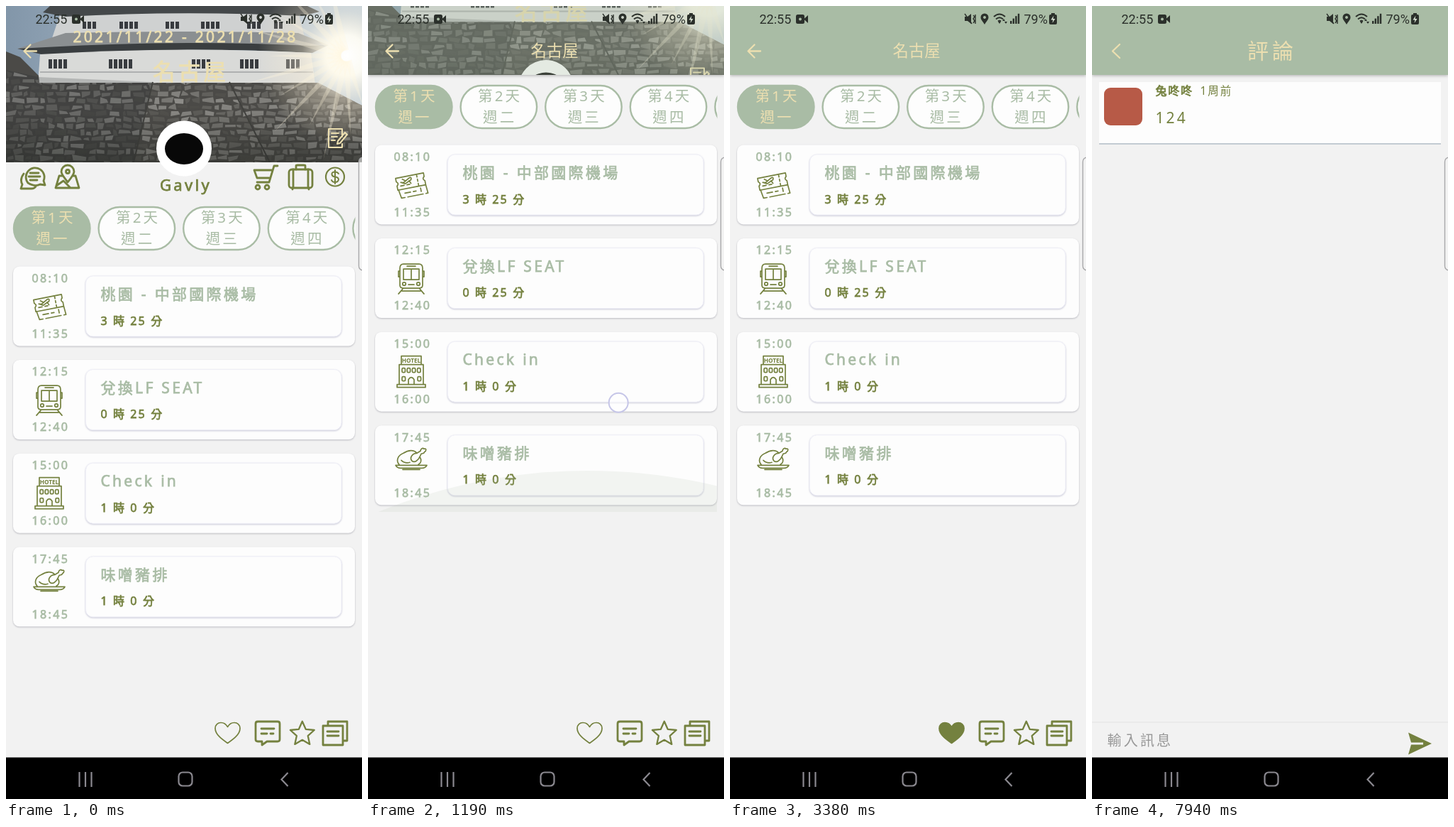
Animation of 502 by 1116 pixels, one loop 8 s. Source, as an HTML page:

```html
<!DOCTYPE html>
<html lang="zh-Hant">
<head>
<meta charset="utf-8">
<title>Trip planner</title>
<style>
html, body { margin: 0; width: 100%; height: 100%; overflow: hidden; background: #f2f2f2; }
svg { display: block; width: 502px; height: 1116px; font-family: "Noto Sans", "Noto Sans CJK TC", sans-serif; white-space: pre; }
.line { fill: none; stroke: #74813f; stroke-width: 1.7; stroke-linecap: round; stroke-linejoin: round; }
.bold { stroke-width: 2.8; }
.olive { fill: #74813f; }
.sage { fill: #a9bca5; }
.cream { fill: #ecdfb0; }
.strong { stroke-width: .75; }
.olive.strong { stroke: #74813f; }
.sage.strong { stroke: #a9bca5; }
.cream.strong { stroke: #ecdfb0; }
.card { fill: #fdfdfd; filter: drop-shadow(0 1.5px 1.2px rgba(90, 90, 105, .36)); }
.inner { fill: #fdfdfd; stroke: #efeff7; filter: drop-shadow(0 1.3px 1px rgba(110, 110, 150, .38)); }
.bar { filter: drop-shadow(0 1px 2px rgba(0, 0, 0, .28)); }
</style>
</head>
<body>
<svg id="stage" viewBox="0 0 502 1116"></svg>
<script>
const LOOP = 8000, COLLAPSE = 171;

const text = (x, y, size, str, cls, spacing = 0, extra = '') =>
  `<text x="${x}" y="${y}" font-size="${size}" class="${cls}" letter-spacing="${spacing}" ${extra}>${str}</text>`;
const path = (d, cls = 'line', extra = '') => `<path d="${d}" class="${cls}" ${extra}/>`;
const rect = (x, y, w, h, r, cls, extra = '') =>
  `<rect x="${x}" y="${y}" width="${w}" height="${h}" rx="${r}" class="${cls}" ${extra}/>`;
const circle = (x, y, r, cls, extra = '') => `<circle cx="${x}" cy="${y}" r="${r}" class="${cls}" ${extra}/>`;
const range = n => [...Array(n).keys()];

function random(seed) {
  return () => (seed = (seed * 16807) % 2147483647) / 2147483647;
}

// Irregular four-sided stones in uneven rows.
function stones() {
  const rnd = random(77);
  let out = '';
  for (let y = 92; y < 222; y += 9) {
    for (let x = -rnd() * 12; x < 502;) {
      const w = 8 + rnd() * 13, v = 78 + rnd() * 64 | 0;
      const corner = (cx, cy) => `${(cx + rnd() * 3).toFixed(1)} ${(cy + rnd() * 4).toFixed(1)}`;
      const d = `M${corner(x, y)}L${corner(x + w - 3, y)}L${corner(x + w - 3, y + 6)}L${corner(x, y + 6)}Z`;
      out += path(d, '', `fill="rgb(${v},${v - 1},${v - 5})"`);
      x += w;
    }
  }
  return out;
}

function photo() {
  const shape = (d, c) => path(d, '', `fill="${c}"`);
  const windows = (y, h, spots) => spots.map(([x, n]) =>
    range(n).map(i => rect(x + i * 7, y, 5, h, 0, '', 'fill="#383b3f"')).join('')).join('');
  const rays = range(13).map(i => {
    const a = 1.25 + i * .27, r = 75 + (i * 37) % 75;
    const p = (q, k) => `${480 + Math.cos(q) * k} ${70 + Math.sin(q) * k}`;
    return path(`M${p(a - .6, 9)}L${p(a, r)}L${p(a + .6, 9)}`, '', 'fill="#fff4dc" opacity=".32"');
  }).join('');
  return `<g clip-path="url(#photoClip)">
    ${rect(0, 0, 502, 220, 0, '', 'fill="url(#sky)"')}
    ${shape('M80 0H410L425 60H60Z', '#cfd1d1')}
    ${shape('M62 0H425L442 8L418 14Q250 6 84 15L52 9Z', '#44484a')}
    ${windows(22, 10, [[108, 3], [160, 4], [225, 3], [275, 4], [340, 3], [378, 2]])}
    ${shape('M84 38Q250 34 412 38L455 55L430 62Q250 52 56 64L16 60Z', '#8b8f91')}
    ${shape('M16 60L56 58Q250 47 430 56L455 55L432 66Q250 56 54 69Z', '#3a3e40')}
    ${shape('M48 68Q250 56 430 66L436 110H45Z', '#d9dad8')}
    ${windows(75, 13, [[60, 4], [145, 5], [262, 4], [330, 4], [395, 3]])}
    ${rect(48, 92, 385, 2, 0, '', 'fill="#aeb0b0"')}
    ${shape('M0 64L20 72L46 98L47 108H440L502 140V220H0Z', '#4b4a47')}
    <g clip-path="url(#wallClip)">${stones()}</g>
    ${shape('M0 90L46 100L207 107L180 220H0Z', 'rgba(30,36,42,.2)')}
    ${path('M207 107L180 220M315 107L372 220', '', 'fill="none" stroke="#41413e" stroke-width="2"')}
    ${rect(0, 150, 502, 70, 0, '', 'fill="url(#shade)"')}
    ${circle(480, 70, 125, '', 'fill="url(#sun)"')}${rays}
  </g>`;
}

const cardIcons = [
  `<g transform="rotate(-11 61 56)">${path('M41 43H81V48Q77 51 81 54V60H41V54Q45 51 41 48ZM71 44V47M71 50V53M71 56V59M46 55H51M55 55H59')}
    ${path('M47 50L51 51L60 46Q64 45 62 49L53 53ZM54 49L50 46M59 50L61 54')}
    ${path('M42 60L44 72H49M53 72H75M79 72H82L81 60M50 66H58M62 66H66M73 63V68')}</g>`,
  path('M50 36H72Q77 36 77 42V66Q77 70 72 70H50Q45 70 45 66V42Q45 36 50 36ZM50 43H72V58H50ZM61 43V58M55 39H67M45 46H43V54H45M77 46H79V54H77M49 71L43 78M73 71L79 78M48 74H74')
    + circle(51, 64, 2.3, 'line') + circle(71, 64, 2.3, 'line') + path('M57 65H65'),
  path('M47 34H75V46H47ZM44 46H78V74H44ZM41 74H81V78H41ZM57 74V67Q61 61 65 67V74')
    + range(4).map(i => rect(48 + i * 7.2, 51, 4.4, 6, 1.5, 'line')).join('')
    + rect(48, 63, 4.6, 6, 1.5, 'line') + rect(70, 63, 4.6, 6, 1.5, 'line')
    + text(61, 43, 8.2, 'HOTEL', 'olive', 0, 'text-anchor="middle" font-weight="800"'),
  path('M44 55C39 50 42 42 50 39C57 34 65 34 69 39L74 36C74 33 77 31 79 33C83 32 82 36 80 37C79 40 77 39 75 40L73 44C76 49 75 53 71 55M69 39C63 39 58 45 62 50C66 53 71 49 73 44M47 49Q52 54 59 52M39 56H83Q81 60 76 60H46Q41 60 39 56M49 62H73')
];

const plans = [
  ['08:10', '11:35', '桃園 - 中部國際機場', '3 時 25 分'],
  ['12:15', '12:40', '兌換LF SEAT', '0 時 25 分'],
  ['15:00', '16:00', 'Check in', '1 時 0 分'],
  ['17:45', '18:45', '味噌豬排', '1 時 0 分']
];

const cards = plans.map(([from, to, title, span], i) => `<g transform="translate(0 ${366.5 + i * 131.6})">
  ${rect(10, 0, 482, 112, 9, 'card')}${rect(112.5, 13.5, 360.5, 85, 10, 'inner')}
  ${text(36.5, 22.3, 16, from, 'sage strong', 2.4)}${text(36.5, 100.3, 16, to, 'sage strong', 2.4)}
  ${text(133.5, 46.5, 21, title, 'sage strong', 3.3)}${text(133.5, 82, 16, span, 'olive strong', 2.1)}
  ${cardIcons[i]}</g>`).join('');

const pills = ['一', '二', '三', '四', '五'].map((day, i) => `<g transform="translate(${i * 119.6} 0)">
  ${rect(11, 283, 107.5, 60, 30, '', `fill="${i ? '#fdfdfd' : '#a9bca5'}" stroke="#a9bca5" stroke-width="2.4"`)}
  ${text(35.5, 304.5, 20.5, `第${i + 1}天`, i ? 'sage' : 'cream', 3.1)}
  ${text(42.5, 335, 20.5, '週' + day, i ? 'sage' : 'cream', 3.1)}</g>`).join('');

const headerIcons =
  path('M31 249A13 13 0 1 1 53 246L55 252L48 251Q41 255 31 249ZM25 236Q19 244 23 251L21 257H36Q40 257 42 254M34 235H46M32 240H48M34 245H44', 'line bold')
  + path('M79 239H75L70 256H103L98 239H94M71 253L81 246L91 256M87 248C82 241 78 237 78 233A9 9 0 0 1 96 233C96 237 91 243 87 248Z', 'line bold') + circle(87, 233, 2.5, 'line bold')
  + path('M383 225H378L371 248H354M350 231H374M350 231L354 242H371', 'line bold') + circle(355, 255, 3, 'line bold') + circle(368, 255, 3, 'line bold')
  + rect(399, 230, 33, 26, 4, 'line bold') + path('M409 230V225Q409 224 411 224H420Q422 224 422 225V230M405 230V256M426 230V256M404 258V256M427 258V256', 'line bold')
  + circle(464, 240.5, 13, 'line', 'style="stroke-width:2.2"')
  + path('M469 236Q467 233 463 233.5Q459 234 459.5 237Q460 240 464 240.5Q469 241 469 244.5Q468 248 464 248Q460 248 459 245M464 231V250', 'line', 'style="stroke-width:2"');

const header = photo()
  + text(94.5, 51, 21, '2021/11/22 - 2021/11/28', 'cream strong', 3.3)
  + text(207, 104, 31.5, '名古屋', 'cream strong', 4.2)
  + path('M474 184V173H455V199H474V194M459 179H469M459 184H467M459 189H464M468 190L478 178L481 181L471 193L467 194Z', 'line', 'style="stroke:#ecdfb0;stroke-width:2"')
  + circle(251, 200.5, 39, '', 'fill="#fff"')
  + '<ellipse cx="251" cy="201" rx="27" ry="22" fill="#080808"/>'
  + text(253.5, 259.5, 22, 'Gavly', 'olive strong', 3.3, 'text-anchor="middle"')
  + headerIcons;

const dark = 'fill="#2b302b"';
const roboto = dark + ' font-family="Roboto, sans-serif"';
const statusBar = text(41.5, 25, 18, '22:55', '', 0, roboto)
  + text(414.5, 25, 18, '79%', '', 0, roboto)
  + rect(93, 12, 12, 13, 2.5, '', dark) + path('M104 18.5L110 13V24Z', '', dark) + circle(99, 18.5, 2, '', 'fill="#a9bca5"')
  + path('M331 15H335L340 11V25L335 21H331Z', '', dark)
  + path('M331 11L341 25M343 13L345 15L343 18L345 21L343 24M346 12V25', '', 'fill="none" stroke="#2b302b" stroke-width="1.4"')
  + path('M359 26C356 21 353.5 19 353.5 16A5.5 5.5 0 0 1 364.5 16C364.5 19 362 21 359 26ZM359 14A2 2 0 1 0 359.01 14Z', '', dark + ' fill-rule="evenodd"')
  + path('M372 15Q380 8 388 15M375 18.5Q380 14 385 18.5M378 21.5Q380 20 382 21.5', '', 'fill="none" stroke="#2b302b" stroke-width="2"')
  + path('M380 25L378 22H382ZM384 21L386 18L388 21ZM387 22H391L389 25Z', '', dark)
  + range(4).map(i => rect(395 + i * 3.6, 21 - i * 3.4, 2.4, 4 + i * 3.4, 0, '', dark)).join('')
  + rect(450, 12, 11, 14, 2, '', dark) + rect(453, 10, 5, 3, 0, '', dark)
  + path('M456.5 13.5L452.5 19.5H455.5L454.5 24L458.5 18H455.5Z', '', 'fill="#dce5d8"');

const heart = 'M312.5 1037.5C304 1031.5 295 1025 295 1016.5C295 1011.5 299 1008.5 303 1008.5C307 1008.5 310.5 1011 312.5 1014.5C314.5 1011 318 1008.5 322 1008.5C326 1008.5 330 1011.5 330 1016.5C330 1025 321 1031.5 312.5 1037.5Z';
const star = 'M' + range(10).map(i => {
  const a = i * Math.PI / 5, r = i % 2 ? 8.3 : 17.8;
  return `${(417.8 + Math.sin(a) * r).toFixed(1)} ${(1024.5 - Math.cos(a) * r).toFixed(1)}`;
}).join('L') + 'Z';

const actions = path(heart, 'line', 'id="heart"')
  + path('M355 1007H383Q386 1007 386 1010V1032Q386 1035 383 1035H368L361 1040V1035H355Q352 1035 352 1032V1010Q352 1007 355 1007ZM360 1017H378M360 1024H368M373 1024H377', 'line bold')
  + path(star, 'line', 'id="star" style="stroke-width:2.3"')
  + path('M454 1012V1007H481V1034H476M447 1013H475V1040H447ZM453 1021H469M453 1027H469', 'line bold');

const arrow = d => path(d, 'line', 'style="stroke:#ecdfb0;stroke-width:2.3"');

const comments = rect(0, 0, 502, 1060, 0, '', 'fill="#f2f2f2"')
  + rect(0, -5, 502, 102, 0, 'sage bar')
  + arrow('M39 54L29 63.5L39 73') + text(219, 74, 30, '評論', 'cream', 5)
  + rect(10, 107, 482, 87, 0, '', 'fill="#fdfdfd"') + rect(10, 193.3, 482, 1.3, 0, '', 'fill="#a9b5c0"')
  + rect(17, 115, 54, 53, 9, '', 'fill="#b75a47"')
  + text(89.5, 125, 16, '兔咚咚', 'olive strong', 1.7) + text(152.5, 125, 15.5, '1周前', 'olive', 1.9)
  + text(89.5, 165, 21, '124', 'olive', 3.1)
  + rect(0, 1007.5, 502, 1, 0, '', 'fill="#e3e3e3"')
  + text(21.5, 1041, 20, '輸入訊息', '', 3.2, 'fill="#989898"')
  + path('M446 1022.5L479 1038L446 1053.5L450 1039.5H467V1036.5H450Z', 'olive');

const nav = rect(0, 1057.5, 502, 59, 0, '')
  + `<g fill="none" stroke="#8b8990" stroke-width="2.2">
    ${path('M103.5 1078V1099M112 1078V1099M120.5 1078V1099', '')}
    ${rect(243.5, 1078.5, 19, 19, 5.5, '')}${path('M397.5 1079L388.5 1088.5L397.5 1098', '')}</g>`;

const stops = list => list.map(([o, c, a = 1]) => `<stop offset="${o}" stop-color="${c}" stop-opacity="${a}"/>`).join('');

document.getElementById('stage').innerHTML = `<defs>
  <linearGradient id="sky">${stops([[0, '#8296a9'], [.5, '#a9b9c8'], [1, '#b6c9dc']])}</linearGradient>
  <linearGradient id="shade" x2="0" y2="1">${stops([[0, '#20231f', 0], [1, '#20231f', .4]])}</linearGradient>
  <radialGradient id="sun">${stops([[0, '#fff'], [.23, '#fffdf4', .95], [.5, '#fff3da', .4], [1, '#fff0d0', 0]])}</radialGradient>
  <clipPath id="photoClip"><rect width="502" height="220"/></clipPath>
  <clipPath id="wallClip"><path d="M0 90L46 103L47 108H440L502 140V220H0Z"/></clipPath>
  <clipPath id="headerClip"><rect id="headerBox" width="502" height="268"/></clipPath>
  <clipPath id="listClip"><rect x="9" width="483.5" height="1058"/></clipPath>
  <clipPath id="glowClip"><rect x="10" y="600" width="482" height="112"/></clipPath>
</defs>
<rect width="502" height="1116" fill="#f2f2f2"/>
<g id="plan">
  <g id="list"><g clip-path="url(#listClip)">${pills}</g>${cards}</g>
  <g clip-path="url(#glowClip)">${circle(310, 1437, 783, 'sage', 'id="glow"')}</g>
  ${rect(0, 0, 502, 97, 0, 'sage bar', 'id="edge"')}
  <g clip-path="url(#headerClip)"><rect width="502" height="268" fill="#f2f2f2"/><g id="header">${header}</g>
  ${rect(0, 0, 502, 268, 0, 'sage', 'id="scrim"')}</g>
  ${text(229.5, 71, 22.4, '名古屋', 'cream', 0, 'id="title"')}
  ${arrow('M43 63.5H26M34.5 54.5L25.5 63.5L34.5 72.5')}
  ${actions}
</g>
<g id="comments">${comments}</g>
${statusBar}
${rect(497.5, 213, 14, 159, 6, '', 'fill="#f4f4f4" fill-opacity=".6" stroke="#a8a8aa" stroke-width="1.4"')}
${circle(0, 0, 13.5, '', 'id="touch" fill="#fff" fill-opacity=".55" stroke="#c6c6e8" stroke-width="2"')}
${nav}`;

const ids = 'plan list glow edge headerBox header scrim title heart star comments touch'.split(' ');
const el = Object.fromEntries(ids.map(id => [id, document.getElementById(id)]));

const tracks = {
  scroll: [[890, 0], [940, 30], [1000, 92], [1075, COLLAPSE]],
  scrim: [[1000, 0], [1600, 1]],
  glow: [[1080, 0], [1190, .13], [1260, .13], [1480, 0]],
  touchX: [[880, 270], [1190, 353], [1260, 366], [2900, 366], [2901, 312], [5100, 312], [5101, 417], [7000, 417], [7001, 362]],
  touchY: [[800, 858], [880, 853], [940, 812], [1190, 559], [1260, 505], [2900, 505], [2901, 1023]],
  touch: [[750, 0], [800, 1], [1250, 1], [1340, 0], [2940, 0], [2990, .9], [3090, .9], [3330, 0],
    [5150, 0], [5250, .9], [5350, .9], [5600, 0], [7090, 0], [7130, .75], [7440, .75], [7560, 0]],
  page: [[7440, 0], [7560, .5], [7700, .86], [7900, 1]]
};

function at(name, t) {
  const keys = tracks[name], next = keys.findIndex(k => k[0] > t);
  if (next === 0) return keys[0][1];
  if (next < 0) return keys[keys.length - 1][1];
  const [[t0, a], [t1, b]] = [keys[next - 1], keys[next]];
  return a + (b - a) * (t - t0) / (t1 - t0);
}

const shift = (node, x, y) => node.setAttribute('transform', `translate(${x} ${y})`);

function render(t) {
  const s = at('scroll', t), page = at('page', t);
  shift(el.list, 0, -s);
  shift(el.header, 0, -s / 2);
  el.headerBox.setAttribute('height', 268 - s);
  el.edge.style.opacity = s < COLLAPSE ? 0 : 1;
  el.scrim.style.opacity = at('scrim', t);
  el.title.style.opacity = Math.max(0, (s - 130) / (COLLAPSE - 130));
  el.glow.style.opacity = at('glow', t);
  el.heart.style.fill = t >= 3060 ? '#74813f' : 'none';
  el.star.style.fill = t >= 5310 ? '#74813f' : 'none';
  shift(el.touch, at('touchX', t), at('touchY', t));
  el.touch.style.opacity = at('touch', t);
  shift(el.comments, 50 * (1 - page), 0);
  el.comments.style.opacity = Math.min(1, page * 1.2);
  shift(el.plan, -20 * page, 0);
}

const start = performance.now();
function frame() {
  render((performance.now() - start) % LOOP);
  requestAnimationFrame(frame);
}
frame();
</script>
</body>
</html>
```
